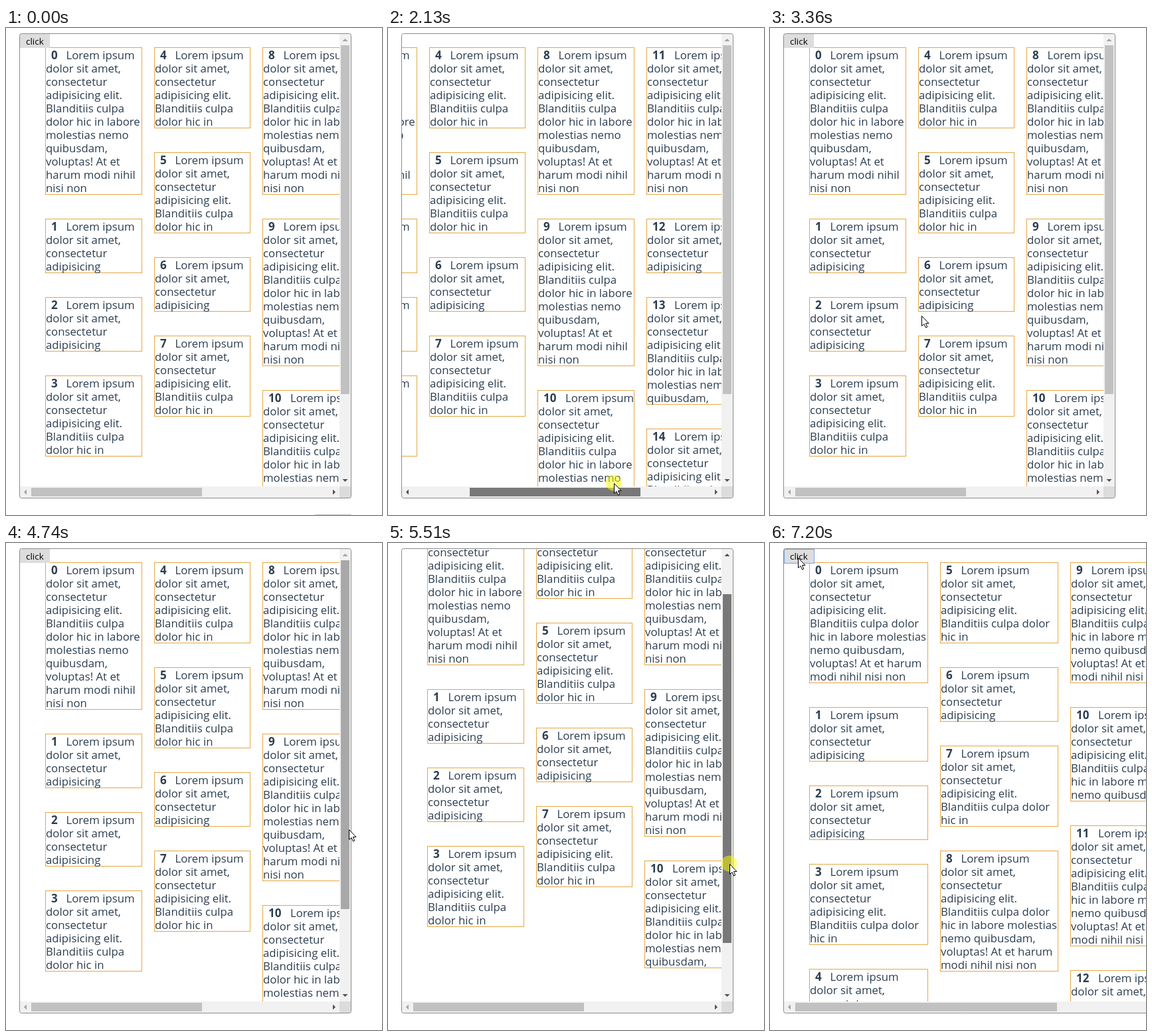
An HTML page with a canvas for the animation above (8 s loop, 566 by 733 pixels).

```html
<!DOCTYPE html>
<html lang="en">
<head>
<meta charset="utf-8">
<title>Scrolling columns</title>
<style>
  html, body { margin: 0; width: 100%; height: 100%; overflow: hidden; background: #fff; }
  canvas { display: block; }
</style>
</head>
<body>
<canvas id="stage" width="566" height="733"></canvas>
<script>
const ctx = document.getElementById('stage').getContext('2d');
const LOOP = 8000, STEP = 76.75;
const FACE = '"Open Sans", "Noto Sans", sans-serif';
const TEXT = '400 16.8px ' + FACE, BOLD = '700 17px ' + FACE, LABEL = '400 13.5px ' + FACE;
const INK = '#2c3e50', EDGE = '#e4a742';

const WORDS = ('Lorem ipsum dolor sit amet, consectetur adipisicing elit. Blanditiis culpa dolor hic in ' +
  'labore molestias nemo quibusdam, voluptas! At et harum modi nihil nisi non').split(' ');
// Each card shows the text up to one of these words
const STOPS = { a: 7, b: 13, c: 17, d: 25 };
const CARDS = [...'daabbbabddcdaccc'].map(k => WORDS.slice(0, STOPS[k]));
const TOP = 29, BOTTOM = 790, GAP = 36, LINE = 20;

// Pointer path: time, x, y
const PATH = [
  [200, 345, 728], [970, 262, 526], [1120, 262, 526], [1430, 255, 702], [1810, 255, 702],
  [2453, 433, 667], [2890, 433, 667], [2900, 425, 667], [3670, 95, 275],
  [4510, 500, 410], [4742, 516, 431], [5250, 514, 540], [5740, 514, 432],
  [6200, 222, 212], [7045, 42, 22]
];
// Horizontal thumb: time, offset
const SLIDE = [[1810, 0], [2453, 178], [2900, 178], [3300, 0]];

function track(keys, t, i = 1) {
  const k = keys.findIndex(p => p[0] > t);
  if (k === 0) return keys[0][i];
  if (k < 0) return keys[keys.length - 1][i];
  const a = keys[k - 1], b = keys[k];
  return a[i] + (b[i] - a[i]) * (t - a[0]) / (b[0] - a[0]);
}

// Movement advances in fixed steps, counted from the start of each burst
function stepped(t) {
  const base = [2900, 1810, 1120, 200, 0].find(b => t >= b);
  return base + Math.floor((t - base + 8) / STEP) * STEP;
}

function rect(x, y, w, h, color) {
  ctx.fillStyle = color;
  ctx.fillRect(x, y, w, h);
}

function write(s, x, y, font, color) {
  ctx.font = font;
  ctx.fillStyle = color;
  ctx.fillText(s, x, y);
}

function wrap(words, width, indent) {
  ctx.font = TEXT;
  const lines = [];
  let line = '';
  for (const word of words) {
    const next = line ? line + ' ' + word : word;
    const room = width - (lines.length ? 0 : indent);
    if (line && ctx.measureText(next).width > room) {
      lines.push(line);
      line = word;
    } else {
      line = next;
    }
  }
  return [...lines, line];
}

function card(n, lines, indent, left, right, y) {
  ctx.strokeStyle = EDGE;
  ctx.lineWidth = 1;
  ctx.strokeRect(left + .5, y + .5, right - left - 1, lines.length * LINE + 1);
  write(n, left + 9, y + 18, BOLD, INK);
  lines.forEach((s, i) => write(s, left + 1 + (i ? 0 : indent), y + 18 + i * LINE, TEXT, INK));
}

// Fill columns from the top, moving on when a card no longer fits
function columns(pitch, width, sx, sy) {
  let x = 59.2, y = TOP;
  CARDS.forEach((words, n) => {
    const indent = n > 9 ? 41 : 30.5;
    const lines = wrap(words, width - .5, indent);
    const h = lines.length * LINE + 2;
    if (y + h > BOTTOM) {
      x += pitch;
      y = TOP;
    }
    card(n, lines, indent, Math.round(x - sx), Math.round(x + width - sx), y - sy);
    y += h + GAP;
  });
}

function arrow(x, y, angle, color) {
  ctx.save();
  ctx.translate(x, y);
  ctx.rotate(angle * Math.PI / 2);
  ctx.fillStyle = color;
  ctx.beginPath();
  ctx.moveTo(-4, 2);
  ctx.lineTo(0, -2);
  ctx.lineTo(4, 2);
  ctx.fill();
  ctx.restore();
}

function button(sx, sy, focus) {
  if (focus) {
    rect(20, 9, 47, 22, '#7ea6e6');
    rect(22, 10, 44, 20, '#dddddd');
  } else {
    rect(21 - sx, 9 - sy, 45, 21, '#dddddd');
  }
  write('click', 30 - sx, 25 - sy, LABEL, '#000');
}

function frame(right) {
  ctx.strokeStyle = '#8b8b8b';
  ctx.lineWidth = 1;
  ctx.beginPath();
  ctx.roundRect(20.5, 8.5, right - 20, 699, 3);
  ctx.stroke();
}

function pointer(x, y, down) {
  if (down) {
    ctx.fillStyle = 'rgba(255,255,0,.5)';
    ctx.beginPath();
    ctx.arc(x - .5, y - .5, 12, 0, 7);
    ctx.fill();
  }
  ctx.save();
  ctx.translate(x + .5, y + .5);
  ctx.fillStyle = '#fff';
  ctx.strokeStyle = '#000';
  const shape = new Path2D('M0 0V15L3.5 12L6 17.5L8.3 16.5L6 11H10.5Z');
  ctx.fill(shape);
  ctx.stroke(shape);
  ctx.restore();
}

function clipped(right, paint) {
  ctx.save();
  ctx.beginPath();
  ctx.rect(21, 9, right - 21, 681);
  ctx.clip();
  paint();
  ctx.restore();
}

const tone = (held, over) => held ? '#787878' : over ? '#a8a8a8' : '#c1c1c1';
const arrowTone = on => on ? '#505050' : '#a3a3a3';

function wideView() {
  clipped(566, () => {
    columns(196.5, 178.5, 0, 0);
    button(0, 0, true);
  });
  rect(21, 690, 545, 17, '#f1f1f1');
  rect(38, 692, 394, 13, tone());
  arrow(29, 698.5, 3, arrowTone(false));
  frame(600);
}

function narrowView(dx, dy, toneX, toneY, focus) {
  const sx = Math.round(dx * 1.89), sy = Math.round(dy * 1.31);
  clipped(502, () => {
    columns(163.5, 145.4, sx, sy);
    button(sx, sy, focus);
  });
  rect(502, 9, 17, 681, '#f1f1f1');
  rect(21, 690, 481, 17, '#f1f1f1');
  rect(502, 690, 17, 17, '#dcdcdc');
  rect(504, 26 + dy, 13, 525, toneY);
  rect(38 + dx, 692, 257, 13, toneX);
  arrow(510.5, 18, 0, arrowTone(dy));
  arrow(510.5, 681, 2, arrowTone(true));
  arrow(29, 698.5, 3, arrowTone(dx));
  arrow(494, 698.5, 1, arrowTone(true));
  frame(519);
}

function draw(now) {
  const t = now % LOOP, q = stepped(t);
  const x = Math.round(track(PATH, q, 1)), y = Math.round(track(PATH, q, 2));
  const holdX = t >= 1810 && t < 3360, holdY = t >= 4780 && t < 5780;
  const wide = t >= 7200, focus = t >= 7120;

  rect(0, 0, 566, 733, '#fff');
  if (wide) {
    wideView();
  } else {
    const dx = Math.round(track(SLIDE, q));
    const dy = holdY ? Math.max(0, y - 432) : 0;
    const overX = !holdX && y >= 692 && y < 705 && x >= 38 && x < 295;
    const overY = !holdX && x >= 504 && x < 517 && y >= 26 && y < 551;
    narrowView(dx, dy, tone(holdX && t >= 1880, overX), tone(holdY, overY), focus);
  }
  if (t < 1810) for (let i = 466; i < 520; i += 2) rect(i, 732, 1, 1, '#7f908c');
  if (t >= 200) pointer(x, y, holdX || holdY || (focus && !wide));
}

let start;
function tick(now) {
  start ??= now;
  draw(now - start);
  requestAnimationFrame(tick);
}
draw(0);
requestAnimationFrame(tick);
</script>
</body>
</html>
```
